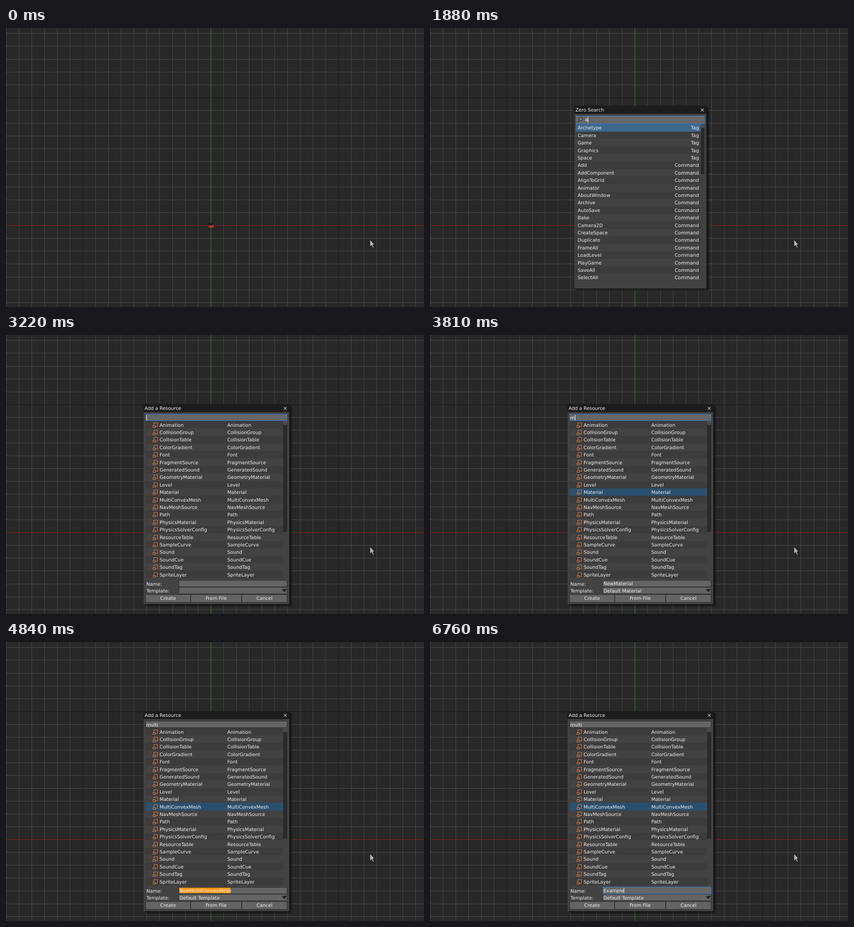
These frames come from a looping animation (917x611 px, 8000 ms). An HTML page:

```html
<!DOCTYPE html>
<html lang="en">
<head>
<meta charset="utf-8">
<title>Add a resource</title>
<style>
  html, body { margin: 0; width: 100%; height: 100%; overflow: hidden; background: #282828; }
  svg { display: block; }
  text { font: 10.35px "DejaVu Sans", sans-serif; fill: #f2f2f2; text-rendering: geometricPrecision; white-space: pre; }
  rect { shape-rendering: crispEdges; }
</style>
</head>
<body>
<svg id="stage" width="917" height="611" viewBox="0 0 917 611">
  <g id="view"></g>
  <g id="panel"></g>
  <path d="M798.5 463.5V479.3L802.2 475.9L804.9 481.6L807.3 480.5L804.8 474.9L808.2 474.4Z"
    fill="#b4b4b4" stroke="#1c1c1c" stroke-width=".9"/>
</svg>
<script>
const LOOP = 8000, ROW = 16.4;
const $ = id => document.getElementById(id);

const tags = ('Archetype Camera Edit Editor Export File Game GameSession Geometry Graphics Help Hide ' +
  'Objects Project Resources Script Select Space Support Tool Windows').split(' ');
const commands = ('Add AddComponent AlignToGrid Animator AboutWindow Archive AutoSave Bake Camera2D ' +
  'CreateSpace Duplicate FrameAll LoadLevel PlayGame SaveAll SelectAll').split(' ');
const resources = ('Animation CollisionGroup CollisionTable ColorGradient Font FragmentSource GeneratedSound ' +
  'GeometryMaterial Level Material MultiConvexMesh NavMeshSource Path PhysicsMaterial PhysicsSolverConfig ' +
  'ResourceTable SampleCurve Sound SoundCue SoundTag SpriteLayer').split(' ');

const asTag = name => [name, 'Tag'];
const asCommand = name => [name, 'Command'];
const allTags = tags.map(asTag);
const withA = [...['Archetype', 'Camera', 'Game', 'Graphics', 'Space'].map(asTag), ...commands.map(asCommand)];
const withAd = ['Add', 'AddComponent', 'LoadLevel', 'ReloadScene', 'Shader'].map(asCommand);

const mesh = { pick: 'MultiConvexMesh', name: 'NewMultiConvexMesh', template: 'Default Template' };
const naming = name => ({ ...mesh, query: 'multi', name, focus: 'name' });

// Each step holds until the next one starts.
const steps = [
  [0, () => ''],
  [920, () => searchPanel('', allTags, 262)],
  [1880, () => searchPanel('a', withA, 320)],
  [2060, () => searchPanel('ad', withAd)],
  [2210, () => searchPanel('add', withAd.slice(0, 2))],
  [3220, () => addPanel({ query: '', focus: 'query' })],
  [3810, () => addPanel({ query: 'm', focus: 'query', pick: 'Material', name: 'NewMaterial', template: 'Default Material' })],
  [4020, () => addPanel({ ...mesh, query: 'mu', focus: 'query' })],
  [4270, () => addPanel({ ...mesh, query: 'mul', focus: 'query' })],
  [4410, () => addPanel({ ...mesh, query: 'mult', focus: 'query' })],
  [4490, () => addPanel({ ...mesh, query: 'multi', focus: 'query' })],
  [4840, () => addPanel({ ...mesh, query: 'multi', selected: true })],
  [5770, () => addPanel({ ...mesh, query: 'multi', selected: true, focus: 'name' })],
  ...[[5850, 1], [6000, 2], [6120, 3], [6350, 4], [6380, 5], [6560, 6], [6760, 7]]
    .map(([at, n]) => [at, () => addPanel(naming('Example'.slice(0, n)))])
];

const box = (x, y, w, h, fill, more = '') =>
  `<rect x="${x}" y="${y}" width="${w}" height="${h}" fill="${fill}" ${more}/>`;
const label = (x, y, s, more = '') => `<text x="${x}" y="${y}" ${more}>${s}</text>`;

function drawView() {
  let out = box(0, 0, 917, 611, '#282828');
  const gridX = k => Math.floor(449.2 + 28.06 * k);
  const gridY = k => Math.floor(432.8 - 28.06 * k);
  const column = (k, fill) => box(gridX(k), 0, 1, 611, fill);
  const line = (k, fill) => box(0, gridY(k), 917, 1, fill);
  for (let k = -16; k <= 16; k++) if (k % 10) out += column(k, '#484848');
  for (let k = -6; k <= 15; k++) if (k % 10) out += line(k, '#4e4e4e');
  out += column(-10, '#1a1a1a') + column(10, '#1a1a1a') + line(10, '#1a1a1a');
  out += line(0, '#941c1c') + column(0, '#348a38');
  out += '<path d="M444.5 432.5L455.5 431.8V437L445 437.5Z" fill="#c4321c"/>';
  for (const x of [446.5, 451.5])
    out += `<circle cx="${x}" cy="429.8" r="2" fill="none" stroke="#151515" stroke-width="1.1"/>`;
  return out;
}

function frame(x, y, w, h, title) {
  let out = '';
  for (let d = 1; d <= 6; d++) out += box(x + d, y + d, w, h - 1, '#000', 'opacity=".13"');
  out += box(x + w, 432, 6, 1, '#1a1a1a');
  out += box(x, y, w, h, '#2b2b2b') + box(x + 1, y + 18, w - 2, h - 19, '#424242');
  out += box(x, y, w, 18, '#1c1c1c') + label(x + 3, y + 13, title);
  const cx = x + w - 9.5, cy = y + 9.5;
  return out + `<path d="M${cx - 3} ${cy - 3}l6 6m0-6l-6 6" stroke="#c8c8c8" stroke-width="1.1"/>`;
}

function field(x, y, w, h, focused) {
  return focused
    ? box(x, y, w, h, '#2f7bd0') + box(x + 1, y + 1, w - 2, h - 2, '#666')
    : box(x, y, w, h, '#303030') + box(x + 1, y + 1, w - 2, h - 2, '#646464');
}

// Text with a caret that is set behind it once its width is known.
const typed = (x, y, s, top, h) =>
  label(x, y, s, 'id="live"') + box(Math.round(x), top, 1, h, '#fff', 'id="caret"');

function searchPanel(query, rows, thumbEnd) {
  const right = thumbEnd ? 594 : 603;
  let out = frame(316, 170, 291, 401, 'Zero Search');
  rows.forEach(([name, kind], i) => {
    const top = Math.round(210.4 + ROW * i), end = Math.round(210.4 + ROW * (i + 1));
    const base = Math.round(222.4 + ROW * i);
    out += box(320, top, right - 320, end - top, i ? (i % 2 ? '#3c3c3c' : '#424242') : '#3e678c');
    out += label(324, base, name) + label(right - 4, base, kind, 'text-anchor="end"');
  });
  if (thumbEnd) out += box(594, 210, 9, 9, '#4a4a4a') + box(594, 219, 8, thumbEnd - 219, '#2a2a2a');
  out += field(320, 192, 283, 18, true);
  out += '<path d="M323.8 206.2L328 202" stroke="#383838" stroke-width="2.2"/>' +
    '<circle cx="330.8" cy="199.2" r="3.8" fill="#747474" stroke="#383838" stroke-width="1.3"/>';
  out += typed(340, 204, query, 194, 14);
  if (rows[0][0] === 'Add') {
    out += box(610.5, 208.5, 201, 17, '#222', 'stroke="#7c7c7c"');
    out += '<path d="M611 212L604 217L611 222Z" fill="#222"/>' +
      '<path d="M610.5 212L604 217L610.5 222" fill="none" stroke="#555"/>';
    out += label(613, 221, 'Add a new content item to the project');
  }
  return out;
}

function addPanel({ query, focus, pick, name = '', template = '', selected }) {
  let out = frame(301, 151, 321, 439, 'Add a Resource');
  resources.forEach((res, i) => {
    const top = Math.round(188.4 + ROW * i), end = Math.round(188.4 + ROW * (i + 1));
    const base = Math.round(200.6 + ROW * i);
    const fill = res === pick ? '#2b506f' : i % 2 ? '#424242' : '#3c3c3c';
    out += box(306, top, 302, end - top, fill);
    out += `<g fill="${fill}" stroke="#e57a35" stroke-width="1.1">` +
      `<rect x="324.5" y="${base - 8.5}" width="8" height="8"/>` +
      `<rect x="322.5" y="${base - 2.5}" width="5" height="4"/></g>`;
    out += label(337, base, res) + label(485.5, base, res);
  });
  out += box(608, 188, 9, 9, '#4a4a4a') + box(608, 197, 9, 234, '#2a2a2a');

  const inQuery = focus === 'query';
  out += field(306, 173, 311, 15, inQuery);
  out += inQuery ? typed(307.5, 185, query, 175, 12) : label(307.5, 185, query);

  const inName = focus === 'name';
  out += label(308, 549, 'Name:') + label(308, 564, 'Template:');
  out += field(379, 552, 238, 15, false);
  out += inName ? field(379, 536, 238, 16, true) : field(379, 537, 238, 15, false);
  if (selected) out += box(380, 538, 112, 12, '#ff9512');
  out += inName && !selected ? typed(380.5, 548, name, 538, 12) : label(380.5, 548, name);
  out += label(380.5, 564, template) + '<path d="M605.5 556H615.5L610.5 563.5Z" fill="#1e1e1e"/>';

  for (const [x, w, s] of [[306, 99, 'Create'], [405, 112, 'From File'], [517, 100, 'Cancel']])
    out += field(x, 568, w, 18, false) + label(x + w / 2, 580, s, 'text-anchor="middle"');
  return out;
}

let shown = -1;
function show(t) {
  let i = steps.length - 1;
  while (steps[i][0] > t) i--;
  if (i === shown) return;
  shown = i;
  $('panel').innerHTML = steps[i][1]();
  const live = $('live');
  if (live) {
    const x = +live.getAttribute('x') + (live.textContent ? live.getComputedTextLength() : 0);
    $('caret').setAttribute('x', Math.round(x));
  }
}

$('view').innerHTML = drawView();
const start = performance.now();
function tick() {
  show((performance.now() - start) % LOOP);
  requestAnimationFrame(tick);
}
tick();
</script>
</body>
</html>
```
